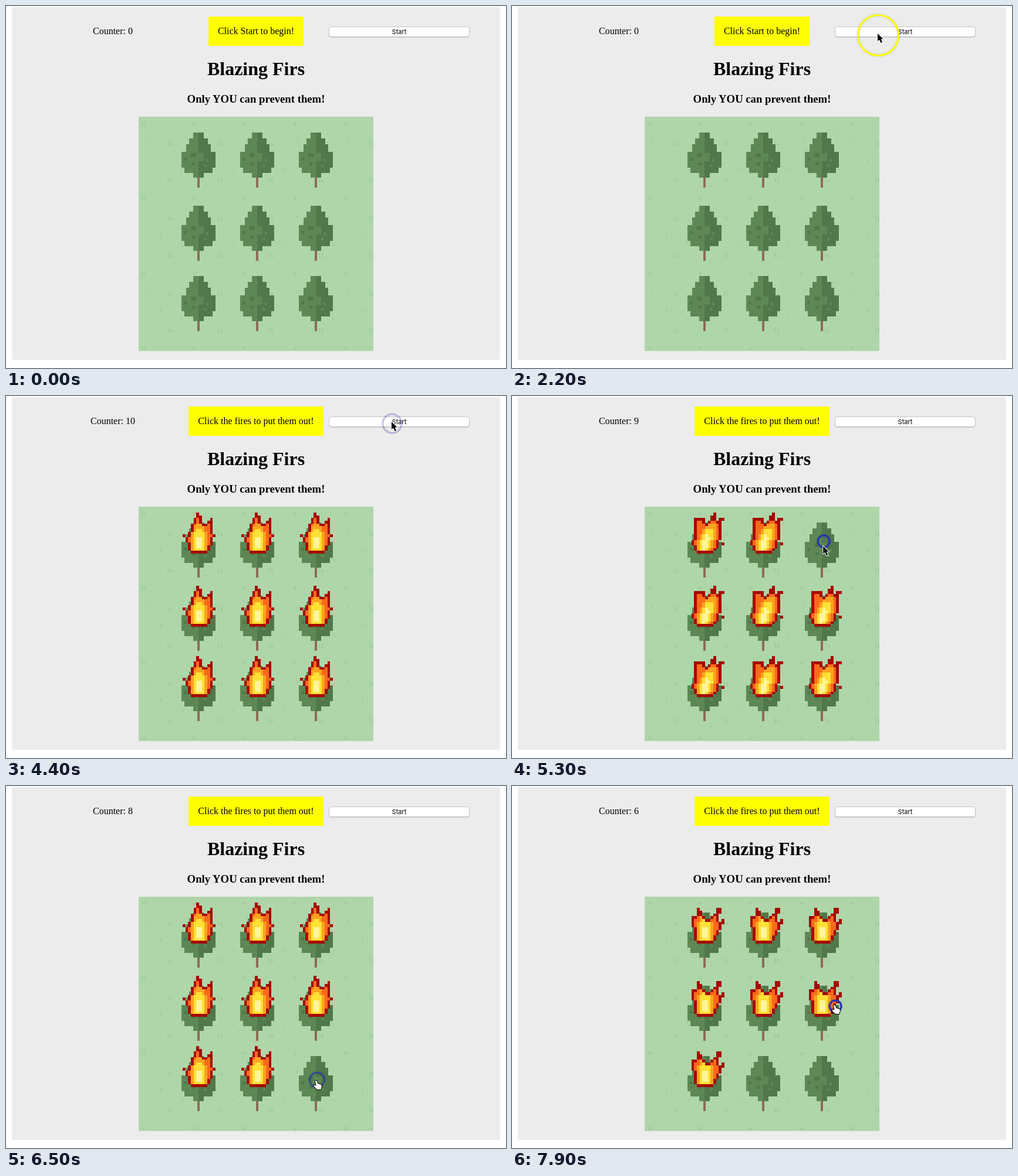
Recreate the animation shown at these times as an HTML page with a canvas. Size 852 by 618 pixels, loop 8 s.

```html
<!DOCTYPE html>
<html lang="en">
<head>
<meta charset="utf-8">
<title>Blazing Firs</title>
<style>
  html, body { margin: 0; width: 100%; height: 100%; overflow: hidden; background: #fff; }
  svg, canvas { position: absolute; left: 0; top: 0; }
  text { font: 16px "Liberation Serif", Times, serif; text-anchor: middle; }
  .title { font-size: 32px; font-weight: bold; }
  .subtitle { font-size: 18.72px; font-weight: bold; }
  .label { font: 11px Inter, "Liberation Sans", sans-serif; }
</style>
</head>
<body>
<svg width="852" height="618">
  <defs>
    <linearGradient id="blue" x2="0" y2="1">
      <stop stop-color="#6cb3fa"/><stop offset="1" stop-color="#1a7ffa"/>
    </linearGradient>
  </defs>
  <rect x="10" y="2" width="832" height="602" fill="#ececec"/>
  <text id="counter" x="182" y="48"></text>
  <rect id="box" y="18" height="50" fill="#ff0"/>
  <text id="message" x="426" y="48"></text>
  <rect x="550" y="36" width="240" height="17.5" rx="4.5" fill="#aaa"/>
  <rect id="button" x="550.5" y="35.5" width="239" height="17" rx="4" stroke="#c4c4c4"/>
  <text id="label" class="label" x="670" y="48">Start</text>
  <text class="title" x="426" y="118">Blazing Firs</text>
  <text class="subtitle" x="426" y="165">Only YOU can prevent them!</text>
</svg>
<canvas id="stage" width="852" height="618"></canvas>
<script>
const LOOP = 8000, STEP = 100, LAG = 50;
const APPEAR = 400, REIGNITE = 6400;
const CELL = 4.67, COLS = 13, ROWS = 15;
const $ = id => document.getElementById(id);
const ctx = $('stage').getContext('2d');
const clamp = v => Math.min(1, Math.max(0, v));

const start = { at: 3900, hold: 400 };
const startUp = start.at + start.hold;
const hits = [
  { at: 5200, tree: 2 }, { at: 5900, tree: 5 }, { at: 6500, tree: 8 },
  { at: 7050, tree: 7 }, { at: 7880, tree: null }
];

// Places where the pointer rests; it eases from one to the next
const stops = [
  { until: APPEAR, x: 40, y: 585 },
  { from: 800, until: 1000, x: 215, y: 368 },
  { from: 1300, until: 1400, x: 519, y: 70 },
  { from: 1700, until: 1700, x: 225, y: 150 },
  { from: 2150, until: 2500, x: 623, y: 47 },
  { from: 2600, until: 3000, x: 638, y: 48 },
  { from: 3400, until: 3400, x: 380, y: 46 },
  { from: 3800, until: 4800, x: 657, y: 44 },
  { from: 5200, until: 5200, x: 530, y: 241 },
  { from: 5700, until: 6000, x: 533, y: 388 },
  { from: 6500, until: 6600, x: 529, y: 502 },
  { from: 7000, until: 7000, x: 416, y: 484 },
  { from: 7800, until: LOOP, x: 550, y: 373 }
];

function pointerAt(t) {
  const i = stops.findIndex(s => t <= s.until), to = stops[i], from = stops[i - 1] || to;
  const u = i ? clamp((t - from.until) / (to.from - from.until)) : 1;
  const k = u * u * (3 - 2 * u);
  return [from.x + (to.x - from.x) * k, from.y + (to.y - from.y) * k];
}

// 0 is released, 1 is fully pressed: quick in, slower out
function pressAt(t) {
  return Math.max(...[start, ...hits].map(({ at, hold = 100 }) =>
    Math.min(clamp((t - at + 180) / 200), clamp((at + hold + 400 - t) / 400))));
}

function burning(i, t) {
  return t >= startUp && !hits.some(hit =>
    hit.tree === i && t >= hit.at && (t < REIGNITE || hit.at >= REIGNITE));
}

const trees = Array.from({ length: 9 }, (_, i) => ({
  x: 328 + 100 * (i % 3), y: [216, 341, 461][Math.floor(i / 3)]
}));

// Each tongue is the [column, row] of a tip that widens and bends towards the base
const poses = {
  leaning: { lean: .1, tongues: [[9.5, 0], [4.5, 3], [2, 5], [12, 4]] },
  forked: { lean: .3, tongues: [[9.5, 0], [3, 2], [5, 2], [12, 2], [12.5, 11]] },
  curled: { lean: 0, tongues: [[5.5, 0], [10.5, 2], [.5, 8], [11.5, 8]] },
  horned: { lean: 0, tongues: [[3.5, 2], [11, 2], [1.5, 5], [12.5, 6]] }
};
const { leaning, forked, curled, horned } = poses;
const flameCycle = [leaning, forked, curled, horned, horned].map(flameCells);

function flameCells({ lean, tongues }) {
  const base = 6;
  const inside = (c, r) => r < ROWS
    && Math.abs(c + .5 - base) < 3 + (ROWS - 1 - r) * 1.2
    && tongues.some(([x, top]) => r >= Math.floor(top)
      && Math.abs(c + .5 - x - (base - x) * (r - top) / (ROWS - 2 - top)) < Math.min(4, .6 + .4 * (r - top)));
  const cells = [];
  for (let r = 0; r < ROWS; r++) for (let c = 0; c < COLS; c++) {
    if (!inside(c, r)) continue;
    const edge = !(inside(c - 1, r) && inside(c + 1, r) && inside(c, r - 1) && inside(c, r + 1));
    const heat = Math.hypot(c + .5 - base - lean * (11 - r), (r - 10.5) / 2.5);
    const color = edge ? '#a50804' : heat < 1.1 ? '#fff49a' : heat < 2.1 ? '#fee135'
      : heat < 3 ? '#fda31f' : '#fb6a1a';
    cells.push([c, r, color]);
  }
  return cells;
}

function rect(color, x, y, w, h) {
  ctx.fillStyle = color;
  ctx.fillRect(x, y, w, h);
}

function at(x, y, draw) {
  ctx.save();
  ctx.translate(x, y);
  draw();
  ctx.restore();
}

const blades = new Path2D('M6 8l3 6 3-6M39 71l-3 7M48 42l3 2-1 6M55 43v6l3-2M48 105l3 2-1 6M55 106v6l3-2M66 25l-3 5M71 87l6 7M14 40l-3 5M26 120l4-4');

function drawField() {
  ctx.save();
  ctx.beginPath();
  ctx.rect(226, 189, 400, 400);
  ctx.clip();
  rect('#aed6a9', 226, 189, 400, 400);
  ctx.strokeStyle = '#91bd93';
  ctx.lineWidth = .8;
  for (let y = 189; y < 589; y += 128)
    for (let x = 226; x < 626; x += 86) at(x, y, () => ctx.stroke(blades));
  ctx.restore();
}

const lightLeaves = new Path2D('M0 35h9v14h-9zM13 45h4v5h-4zM9 55h5v4h-5z');
const darkLeaves = new Path2D('M-13 35h9v7h-9zM-25 43h5v5h-5zM-11 51h6v5h-6z');

function drawTree({ x, y }) {
  const light = '#5d8855', dark = '#50784a';
  at(x, y, () => {
    rect('#8e6b51', -2, 76, 4, 18);
    let top = 0;
    for (const [height, half] of [[10, 9], [10, 16], [13, 21], [27, 29], [9, 24], [8, 9]]) {
      rect(light, -half, top, half, height);
      rect(dark, 0, top, half, height);
      top += height;
    }
    ctx.fillStyle = light;
    ctx.fill(lightLeaves);
    ctx.fillStyle = dark;
    ctx.fill(darkLeaves);
  });
}

function drawFlame({ x, y }, cells) {
  const snap = n => Math.round(n * CELL);
  at(x - 27, y - 17, () => {
    for (const [c, r, color] of cells)
      rect(color, snap(c), snap(r), snap(c + 1) - snap(c), snap(r + 1) - snap(r));
  });
}

const arrow = new Path2D('M0 0V13L3 10.5 5.5 16 8 15 5.5 9.5H9.5Z');
const hand = new Path2D('M-2 2Q-.5 0 1 2L2 6 7 7.5Q9 8 9 10L7.5 16H1L-4 11Q-5 8-3 8.5L-.5 10Z');

function drawPointer(t) {
  if (t < APPEAR) return;
  const [x, y] = pointerAt(t);
  const [ringX, ringY] = pointerAt(t - LAG);
  const press = pressAt(t);
  ctx.save();
  ctx.globalAlpha = (2 * press - 1) ** 2;
  ctx.strokeStyle = press > .5 ? '#2130bd' : '#ff0';
  ctx.lineWidth = 3;
  ctx.shadowColor = '#0003';
  ctx.shadowBlur = 3;
  ctx.beginPath();
  ctx.arc(ringX + 1, ringY + 3, 34.5 - 24.5 * press, 0, 7);
  ctx.stroke();
  ctx.restore();

  const overFire = trees.some((tree, i) => burning(i, t - LAG)
    && Math.abs(x - tree.x) < 30 && y > tree.y - 17 && y < tree.y + 54);
  const shape = overFire ? hand : arrow;
  at(x, y, () => {
    ctx.lineJoin = 'round';
    ctx.lineWidth = 2;
    ctx.strokeStyle = overFire ? '#000' : '#fff';
    ctx.fillStyle = overFire ? '#fff' : '#000';
    ctx.stroke(shape);
    ctx.fill(shape);
  });
}

function updatePanel(t) {
  const started = t >= startUp, down = t >= start.at && !started;
  const count = started ? 10 - hits.filter(hit => t >= hit.at + STEP).length : 0;
  const width = started ? 230 : 162;
  $('counter').textContent = `Counter: ${count}`;
  $('message').textContent = started ? 'Click the fires to put them out!' : 'Click Start to begin!';
  $('box').setAttribute('x', 426 - width / 2);
  $('box').setAttribute('width', width);
  $('button').setAttribute('fill', down ? 'url(#blue)' : '#fff');
  $('label').setAttribute('fill', down ? '#fff' : '#000');
}

function render(t) {
  updatePanel(t);
  ctx.clearRect(0, 0, 852, 618);
  drawField();
  const cells = flameCycle[Math.floor(t % 1000 / 200)];
  trees.forEach((tree, i) => {
    drawTree(tree);
    if (burning(i, t)) drawFlame(tree, cells);
  });
  drawPointer(t);
}

const begin = performance.now();
let shown = -1;
function tick() {
  const t = Math.floor((performance.now() - begin) % LOOP / STEP) * STEP;
  if (t !== shown) render(shown = t);
  requestAnimationFrame(tick);
}
tick();
</script>
</body>
</html>
```
